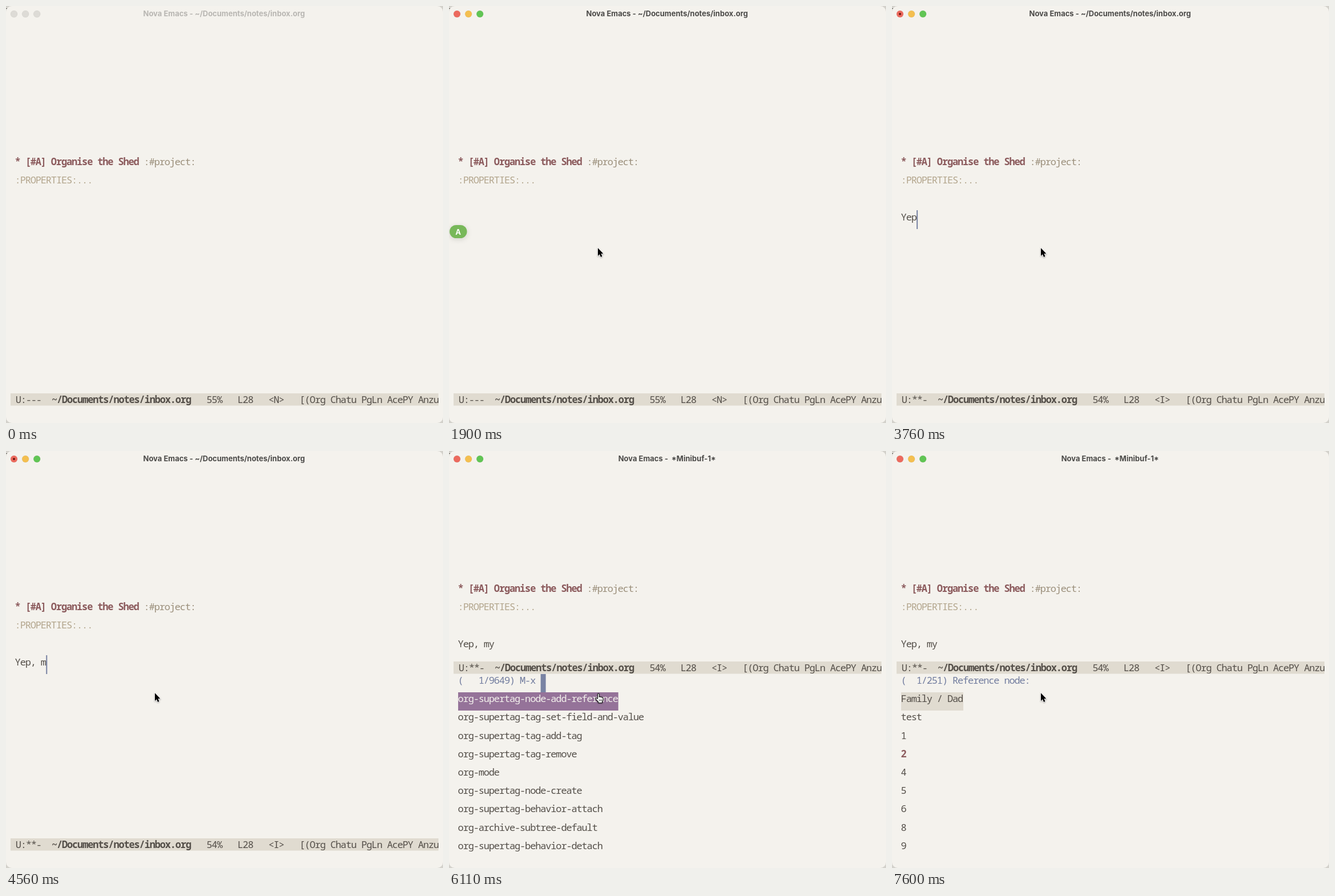
Recreate the animation shown at these times as an HTML page. Size 766 px wide and 731 px high, loop 8 s.

```html
<!DOCTYPE html>
<html lang="en">
<head>
<meta charset="utf-8">
<title>Notes</title>
<style>
html, body { margin: 0; width: 100%; height: 100%; overflow: hidden; background: #d3d1cb; }
svg { display: block; width: 766px; height: 731px; }
text { white-space: pre; }
.mono { font: 17px "Noto Sans Mono", monospace; font-stretch: 87.5%; letter-spacing: calc(9.04px - 1ch); }
.ui { font: 700 13px Inter, sans-serif; text-anchor: middle; }
.b { font-weight: 700; }
.badge { filter: drop-shadow(0 2px 5px #0002); }
.pointer { filter: drop-shadow(0 1px 1px #0005); }
</style>
</head>
<body>
<svg id="stage" viewBox="0 0 766 731">
  <rect width="4" height="1" y="4" fill="#55524d"/>
  <rect width="766" height="731" rx="10" fill="#f4f2ed"/>
  <clipPath id="pane"><rect x="8" width="750" height="731"/></clipPath>
  <g id="scene"></g>
</svg>
<script>
const LOOP = 8000, CELL = 9.04, ROW = 32.2;
const INK = '#544f49', ROSE = '#8b5a5c', BLUE = '#727d9f', CURSOR = '#7983a3',
      BAR = '#e0dbd0', PAPER = '#f4f2ed', PLUM = '#957399';
const TYPED = 'Yep, my ';
const KEYS = [2760, 3010, 3760, 4010, 4190, 4560, 4810, 5120];
const COMMANDS = ['org-supertag-node-add-reference', 'org-supertag-tag-set-field-and-value',
  'org-supertag-tag-add-tag', 'org-supertag-tag-remove', 'org-mode', 'org-supertag-node-create',
  'org-supertag-behavior-attach', 'org-archive-subtree-default', 'org-supertag-behavior-detach'];
const NODES = ['Family / Dad', 'test', '1', '2', '4', '5', '6', '8', '9'];

const esc = s => s.replace(/&/g, '&amp;').replace(/</g, '&lt;').replace(/>/g, '&gt;');
const rect = (x, y, w, h, fill, more = '') =>
  `<rect x="${x}" y="${y}" width="${w}" height="${h}" fill="${fill}" ${more}/>`;
const mono = (s, x, y, fill = INK, bold = false) =>
  `<text class="mono${bold ? ' b' : ''}" x="${x - .4}" y="${y}" fill="${fill}">${esc(s)}</text>`;
const ui = (s, x, y, fill) => `<text class="ui" x="${x}" y="${y}" fill="${fill}">${esc(s)}</text>`;
const within = (t, a, b) => t >= a && t < b;
const typedCount = t => KEYS.filter(k => t >= k).length;

function titleBar(t, focused, mini) {
  const colors = focused ? ['#ec6a5e', '#f4bf4f', '#61c554'] : Array(3).fill('#dddbd6');
  const dots = colors.map((c, i) =>
    `<circle cx="${14 + 20.1 * i}" cy="14" r="6" fill="${c}" stroke="#00000018" stroke-width=".5"/>`);
  const unsaved = within(t, 2760, 6110) ? '<circle cx="14" cy="14" r="2" fill="#6d150f"/>' : '';
  const name = mini ? ' *Minibuf-1*' : '~/Documents/notes/inbox.org';
  return dots.join('') + unsaved + ui('Nova Emacs - ' + name, 382.2, 18, focused ? '#4b4a48' : '#b8b6b2');
}

function modeLine(t, y) {
  const edited = t >= 3010, base = y + 17;
  const at = col => 8 + col * CELL;
  return `<g clip-path="url(#pane)">` + rect(8, y, 750, 21.5, BAR) +
    mono(edited ? 'U:**-' : 'U:---', at(1), base) +
    mono('~/Documents/notes/inbox.org', at(8), base, INK, true) +
    mono(`${edited ? 54 : 55}%   L28   <${t < 2150 ? 'N' : 'I'}>   [(Org Chatu PgLn AcePY Anzu`, at(38.05), base) +
    '</g>';
}

function buffer(t, top) {
  const base = i => top + 17.5 + ROW * i;
  return mono('* [#A] Organise the Shed', 16, base(0), ROSE, true) +
    mono(':#project:', 16 + 25 * CELL, base(0), '#9b8f7b') +
    mono(':PROPERTIES:...', 16, base(1), '#b3a68d') +
    mono(TYPED.slice(0, typedCount(t)), 16, base(3));
}

function editCursor(t) {
  if (within(t, 1340, 1900)) return rect(16, 358, 9, 33, CURSOR);
  const on = within(t, 2150, 2580) || within(t, 2760, 3510) || within(t, 3760, 5680);
  return on ? rect(16 + typedCount(t) * CELL, 358, 2, 33, CURSOR) : '';
}

function badge(t) {
  if (!within(t, 1160, 2150)) return '';
  const p = Math.min(1, (t - 1100) / 240);
  return `<g class="badge" opacity="${p.toFixed(2)}">` +
    rect(1, 384, 30.5, 23, '#78b85a', 'rx="11.5"') + ui('A', 16.2, 400.5, '#fff') + '</g>';
}

function minibuffer(t) {
  const picking = t >= 7040;
  const prompt = picking ? '(  1/251) Reference node: ' : '(   1/9649) M-x ';
  const list = picking ? NODES : COMMANDS;
  const blink = picking ? 7600 : 6670;
  let out = mono(prompt, 16, 408, BLUE);
  if (t < blink) out += rect(16 + prompt.length * CELL, 391, 9, 32, CURSOR);
  out += rect(16, 423, list[0].length * CELL + .5, 32, picking ? BAR : PLUM);
  list.forEach((s, i) => {
    const heading = s === '2';
    const color = heading ? ROSE : i || picking ? INK : PAPER;
    out += mono(s, 16, 408 + ROW * (i + 1), color, heading);
  });
  return out;
}

function pointer(t) {
  if (t < 560) return '';
  // The glide slows down and advances in 60 ms ticks.
  const p = Math.min(1, Math.floor((t - 560) / 60) / 13);
  const rest = (1 - p) ** 3.25;
  const x = 261 - 241 * rest, y = 424 + 29 * rest;
  const hand = within(t, 6110, 7100);
  const shape = hand
    ? '<path d="M-.4 10V2.6Q-.4 1 .9 1T2.3 2.6V7Q3.6 6 4.7 7.3 6 6.5 7 8 9 7.5 9 9.8V12.5L7.6 15.5V17.5H.6V15.8L-4 10.5Q-4.6 8.7-3 8.7Z" fill="#fff" stroke="#111" stroke-width="1.1"/>' +
      '<path d="M2.4 11.5V14.5M4.5 11.5V14.5M6.5 11.5V14.5" stroke="#111" stroke-width=".8"/>'
    : '<path d="M0 .3V14L3 11.3 5 16 7.5 14.9 5.5 10.3H9.5Z" fill="#000" stroke="#fff" stroke-width="1.4" paint-order="stroke"/>';
  return `<g class="pointer" transform="translate(${x.toFixed(1)} ${y.toFixed(1)})">${shape}</g>`;
}

function draw(t) {
  const mini = t >= 6110;
  let out = titleBar(t, t >= 560, mini) + buffer(t, mini ? 229.5 : 261.5) + modeLine(t, mini ? 369 : 679);
  out += mini ? minibuffer(t) : editCursor(t) + badge(t);
  if (within(t, 2150, 2760)) out += mono('-- INSERT --', 16, 718);
  return out + pointer(t);
}

const scene = document.getElementById('scene');
let last = '';
function tick() {
  const next = draw(performance.now() % LOOP);
  if (next !== last) scene.innerHTML = last = next;
  requestAnimationFrame(tick);
}
tick();
</script>
</body>
</html>
```
